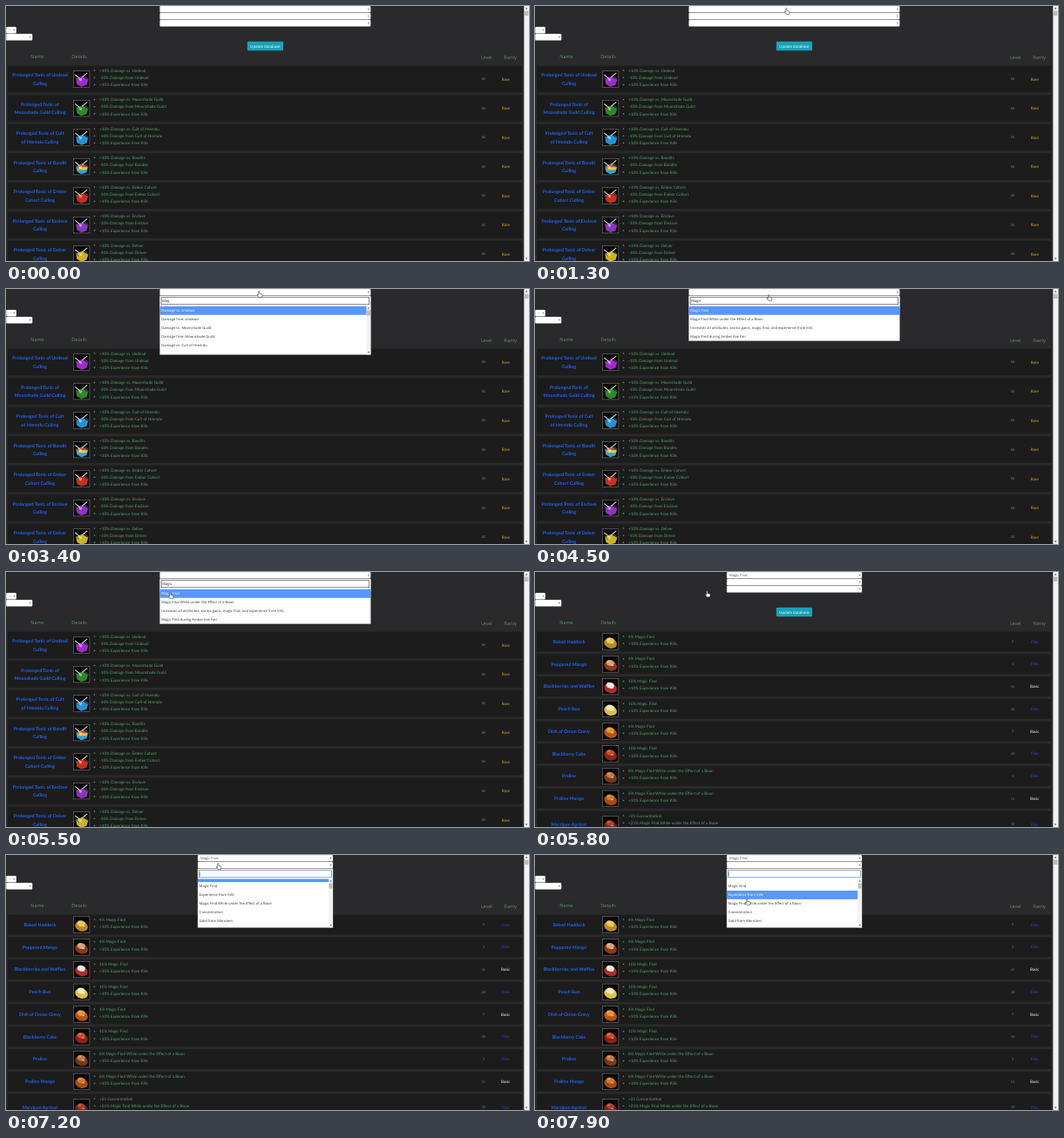
Animation, 600 px wide and 293 px high, one loop 8 s. Source, as an HTML page:

```html
<!DOCTYPE html>
<html lang="en">
<head>
<meta charset="utf-8">
<title>Item table with filters</title>
<style>
  html, body { margin: 0; height: 100%; overflow: hidden; background: #2a292b; }
  svg { display: block; width: 100vw; height: 100vh; }
  text { font-family: "Open Sans", "Noto Sans", sans-serif; text-rendering: geometricPrecision; white-space: pre; }
  .hand { font-family: Lato, "Open Sans", sans-serif; }
  .name { font-weight: 700; fill: #2163f2; }
  .detail { fill: #55a06b; }
  .head { fill: #57966b; }
</style>
</head>
<body>
<svg id="stage" viewBox="0 0 600 293" preserveAspectRatio="none"></svg>
<script>
const LOOP = 8000, CHOSEN = 5700;
const stage = document.getElementById('stage');
const timed = [];

function add(parent, tag, attrs = {}, content = '') {
  const el = document.createElementNS('http://www.w3.org/2000/svg', tag);
  for (const key in attrs) el.setAttribute(key, attrs[key]);
  el.textContent = content;
  parent.append(el);
  return el;
}
const group = (parent, x = 0, y = 0) => add(parent, 'g', { transform: `translate(${x} ${y})` });
const rect = (parent, x, y, width, height, fill, more = {}) =>
  add(parent, 'rect', { x, y, width, height, fill, ...more });
const path = (parent, d, fill, more = {}) => add(parent, 'path', { d, fill, ...more });

// y is the middle of the line
const label = (parent, x, y, size, content, more = {}) =>
  add(parent, 'text', { x, y: y + size * 0.35, 'font-size': size, ...more }, content);

// a group seen only between two times of the loop
function scene(from, to, parent = stage) {
  const el = group(parent);
  timed.push({ el, from, to });
  return el;
}

function select(parent, x, y, width, value = '') {
  rect(parent, x, y, width, 7.4, '#fff', { rx: 1, stroke: '#aaa', 'stroke-width': 0.3 });
  label(parent, x + 3, y + 3.8, 4.1, value, { fill: '#555' });
  path(parent, `M${x + width - 3.4} ${y + 3.1}h2l-1 1.5z`, '#666');
}

function potion(parent, color) {
  const mixed = color === 'mixed';
  path(parent, 'M3 9 L10 6 L17 10 L15 16 L9 18 L4 15Z', mixed ? '#28a6d8' : color);
  if (mixed) {
    path(parent, 'M4 9 L10 6 L16 10Z', '#e33d2e');
    path(parent, 'M4 10 L16 10 L15 13 L5 13Z', '#f0c52b');
  }
  path(parent, 'M6 10 L10 8 L9 12Z', '#fff', { opacity: 0.5 });
  path(parent, 'M2 4 L8 9 M10 7 L16 2', 'none', { stroke: '#ddd', 'stroke-width': 1.1 });
  path(parent, 'M3 8 L6 12 M13 6 L17 9', 'none', { stroke: '#555', 'stroke-width': 1 });
}

function dish(parent, [base, top]) {
  add(parent, 'ellipse', { cx: 9.3, cy: 11, rx: 7.5, ry: 5.6, fill: base, transform: 'rotate(18 9 11)' });
  add(parent, 'ellipse', { cx: 9, cy: 8, rx: 4.6, ry: 3.4, fill: top, transform: 'rotate(18 9 8)' });
  path(parent, 'M6 7 L9 6 M10 10 L13 11', 'none', { stroke: '#fff', 'stroke-width': 0.8, opacity: 0.6 });
}

const rarityColors = { Rare: '#d9ad22', Fine: '#3148d4', Basic: '#f2f2f2' };

function row(parent, middle, height, item, drawIcon) {
  rect(parent, 2, middle - height / 2, 590, height, '#1c1c1c');
  item.name.forEach((line, i) => label(parent, 39,
    middle + (i - (item.name.length - 1) / 2) * 9.4, 5.3, line,
    { class: 'hand name', 'text-anchor': 'middle' }));

  const icon = group(parent, 77.3, middle - 9.2);
  rect(icon, 0, 0, 18.6, 18.6, '#080808', { stroke: '#8a8a8a', 'stroke-width': 0.5 });
  drawIcon(icon, item.art);

  item.details.forEach((line, i) => {
    const y = middle + 2 - item.details.length * 4 + i * 8.2;
    add(parent, 'circle', { cx: 101.5, cy: y, r: 0.8, fill: '#55a06b' });
    label(parent, 107, y, 4.65, line, { class: 'hand detail' });
  });
  label(parent, 548, middle, 3.8, item.level, { class: 'hand', fill: '#6b8a74', 'text-anchor': 'middle' });
  label(parent, 573.3, middle, 4.6, item.rarity,
    { class: 'hand', fill: rarityColors[item.rarity], 'text-anchor': 'middle' });
}

// shared page parts
rect(stage, 0, 0, 600, 293, '#2a292b');
select(stage, 0.2, 24, 11.6);
label(stage, 3, 26.8, 4.1, '...', { fill: '#444' });
select(stage, 0.2, 32, 30);
rect(stage, 276.8, 40.8, 41.2, 10.4, '#17a2b8', { rx: 1 });
label(stage, 297.4, 46.2, 4.3, 'Update database', { fill: '#fff', 'text-anchor': 'middle' });
[['Name', 28.3, 57.9], ['Details', 75.3, 57.9], ['Level', 544.7, 58.6], ['Rarity', 571.3, 58.6]]
  .forEach(([title, x, y]) => label(stage, x, y, 5.5, title, { class: 'head' }));

// first table
const foes = [
  ['Undead', ['Prolonged Tonic of Undead', 'Culling'], '#a32ad0'],
  ['Moonshade Guild', ['Prolonged Tonic of', 'Moonshade Guild Culling'], '#2c8a2a'],
  ['Cult of Hremdu', ['Prolonged Tonic of Cult', 'of Hremdu Culling'], '#2492d6'],
  ['Bandits', ['Prolonged Tonic of Bandit', 'Culling'], 'mixed'],
  ['Ember Cohort', ['Prolonged Tonic of Ember', 'Cohort Culling'], '#c8301f'],
  ['Enclave', ['Prolonged Tonic of Enclave', 'Culling'], '#8d35bd'],
  ['Delver', ['Prolonged Tonic of Delver', 'Culling'], '#c9b522']
];
const before = scene(0, CHOSEN);
foes.forEach(([foe, name, art], i) => row(before, 84 + 33.5 * i, 30.6, {
  name, art, level: '80', rarity: 'Rare',
  details: [`+10% Damage vs. ${foe}`, `-10% Damage from ${foe}`, '+10% Experience from Kills']
}, potion));
[0, 8, 16].forEach(y => select(before, 176.5, y, 241.8));

// filtered table
const boon = 'Magic Find While under the Effect of a Boon';
const meals = [
  ['Baked Haddock', '4% Magic Find', '5', 'Fine', ['#b98a2c', '#e8c84a']],
  ['Peppered Mango', '4% Magic Find', '5', 'Fine', ['#8c3a1c', '#d9a070']],
  ['Blackberries and Waffles', '10% Magic Find', '45', 'Basic', ['#b02a2a', '#f2e6e0']],
  ['Peach Bun', '10% Magic Find', '20', 'Fine', ['#d9c24a', '#f0e6b0']],
  ['Dish of Onion Gravy', '4% Magic Find', '5', 'Basic', ['#b8541a', '#e8922a']],
  ['Blackberry Cake', '10% Magic Find', '20', 'Fine', ['#8a2418', '#d0482e']],
  ['Praline', `8% ${boon}`, '5', 'Fine', ['#7a3a18', '#c07a48']],
  ['Praline Mango', `8% ${boon}`, '15', 'Basic', ['#a84a14', '#d07a2c']],
  ['Marzipan Apricot', `+21% ${boon}`, '50', 'Fine', ['#6a2418', '#b03a2c']]
];
const after = scene(CHOSEN, LOOP);
meals.forEach(([name, bonus, level, rarity, art], i) => {
  const tall = i === 8;
  const details = [bonus, '+10% Experience from Kills'];
  if (tall) details.unshift('+21 Concentration');
  row(after, tall ? 290 : 80 + 25.75 * i, tall ? 30.6 : 22.8,
    { name: [name], details, level, rarity, art }, dish);
});
['Magic Find', '', ''].forEach((value, i) => select(after, 220, i * 8, 155, value));

// page scrollbar
rect(stage, 594.3, 0, 5.7, 293, '#f1f1f1');
rect(stage, 595, 5.6, 4.4, 5.4, '#bcbcbc');
path(stage, 'M595.8 3.4h2.6l-1.3 -1.6z M595.8 289.6h2.6l-1.3 1.6z', '#555');

// lit: [item index, from, to], where -1 is the blank first option
function dropdown(from, to, { x, y, width, typed = '', items, lit, scroll = false, blank = false }) {
  const box = scene(from, to);
  const pitch = 9.9, first = y + (blank ? 20 : 16.8);
  const height = scroll ? 67.4 : 12 + items.length * pitch;
  const listWidth = width - (scroll ? 4.6 : 0);
  rect(box, x, y, width, height, '#fff', { stroke: '#aaa', 'stroke-width': 0.4 });
  rect(box, x + 1.6, y + 1.8, width - 3.2, 8, '#fff',
    { stroke: typed ? '#333' : '#3a76c8', 'stroke-width': 0.6 });
  if (typed) label(box, x + 2.8, y + 5.9, 4.1, typed, { fill: '#222' });
  else rect(box, x + 2.6, y + 3.6, 0.4, 4.6, '#222');

  const option = (parent, i, fill) => label(parent, x + 1.8, first + i * pitch, 4.1, items[i], { fill });
  items.forEach((_, i) => option(box, i, '#333'));
  lit.forEach(([i, start = from, end = to]) => {
    const mark = scene(start, end, box);
    if (i < 0) {
      rect(mark, x, y + 11.5, listWidth, 3.6, '#5897fb');
    } else {
      rect(mark, x, first + (i - 0.5) * pitch, listWidth, pitch, '#5897fb');
      option(mark, i, '#fff');
    }
  });
  if (scroll) {
    const left = x + width - 4.6;
    rect(box, left, y + 11.5, 4.6, height - 11.5, '#f1f1f1');
    rect(box, left + 0.4, y + 16.5, 3.8, 6, '#bdbdbd');
    path(box, `M${left + 1.2} ${y + 14.4}h2.2l-1.1 -1.4z M${left + 1.2} ${y + 64}h2.2l-1.1 1.4z`, '#555');
  }
}

const wide = { x: 176.5, y: 8, width: 241.8 };
const damage = foes.slice(0, 3).flatMap(([foe]) => [`Damage vs. ${foe}`, `Damage from ${foe}`]);
const kills = 'Experience from Kills';
const allStats = [...damage.slice(0, 2), kills, ...damage.slice(2, 4)];

dropdown(2900, 3000, { ...wide, items: allStats, lit: [[-1]], scroll: true, blank: true });
dropdown(3000, 3200, { ...wide, typed: 'M', items: allStats, lit: [[0]], scroll: true });
dropdown(3200, 3400, { ...wide, typed: 'Ma', items: damage.slice(0, 5), lit: [[0]], scroll: true });
dropdown(3400, 3600, { ...wide, typed: 'Mag', items: damage.slice(0, 5), lit: [[0]], scroll: true });
dropdown(3600, CHOSEN, {
  ...wide, typed: 'Magic', lit: [[0]],
  items: ['Magic Find', boon,
    'Increases all attributes, karma gains, magic find, and experience from kills.',
    'Magic Find during Amber Eve Fair']
});
dropdown(7200, LOOP, {
  x: 220, y: 16, width: 155, scroll: true, blank: true,
  items: ['Magic Find', kills, boon, 'Concentration', 'Gold from Monsters'],
  lit: [[-1, 7200, 7650], [0, 7650, 7800], [1, 7800, LOOP]]
});

// pointer
const pointer = scene(600, LOOP);
path(pointer,
  'M-1.3 -3.2q.6 -.8 1.2 0v2.5l2.3 .5q.9 .3 .8 1.2l-.5 2.6h-3.3l-2 -2.6q-.3 -.9 .7 -.6l.8 .7z',
  '#fff', { stroke: '#222', 'stroke-width': 0.5, 'stroke-linejoin': 'round' });
const stops = [
  [0, 330, 293], [600, 330, 293], [1300, 289, 6], [1900, 289, 6], [2100, 291, 6], [4100, 291, 6],
  [4500, 269, 10], [4900, 222, 18], [5100, 222, 18], [5200, 205, 22], [5400, 192, 26],
  [5500, 189, 27], [5700, 189, 27], [6100, 225, 20], [6300, 232, 18], [6500, 241, 16],
  [6700, 244, 13], [7400, 244, 13], [7900, 244, 54], [LOOP, 244, 54]
];

function draw(time) {
  for (const { el, from, to } of timed) {
    el.style.display = time >= from && time < to ? '' : 'none';
  }
  const next = stops.findIndex(([stop]) => stop > time);
  const [t0, x0, y0] = stops[next - 1], [t1, x1, y1] = stops[next];
  const part = (time - t0) / (t1 - t0);
  pointer.setAttribute('transform', `translate(${x0 + (x1 - x0) * part} ${y0 + (y1 - y0) * part})`);
}

function tick() {
  draw(performance.now() % LOOP);
  requestAnimationFrame(tick);
}
tick();
</script>
</body>
</html>
```
